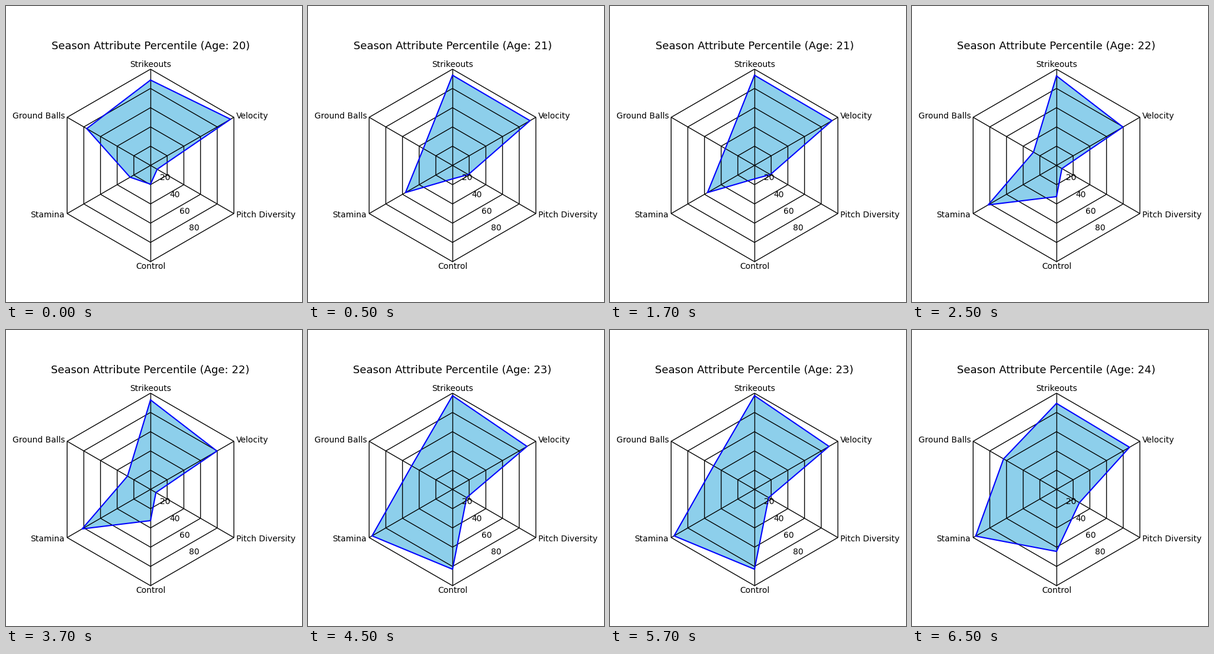
A matplotlib script that plays this animation: 500x500 px, repeating every 8000 ms.

```python
import numpy as np
import matplotlib.pyplot as plt
from matplotlib.animation import FuncAnimation

plt.rcParams["font.family"] = "DejaVu Sans"
plt.rcParams["font.size"] = 10

SIZE, DPI = 500, 100
CENTER = np.array([244.1, 269.3])
RADIUS = 162.6
FIRST_AGE = 20

# Clockwise from the top, one percentile per age.
PERCENTILES = {
    "Strikeouts": [88.7, 93.7, 93, 97.4, 89.4],
    "Velocity": [96, 93, 79.7, 89.4, 87.6],
    "Pitch Diversity": [8, 19, 6.5, 17, 27.5],
    "Control": [19.5, 14, 32.4, 82.9, 64.4],
    "Stamina": [24.5, 56.4, 82, 96.5, 97],
    "Ground Balls": [76.5, 35, 27.6, 49, 63.5],
}
SEASONS = np.transpose(list(PERCENTILES.values()))

ANGLES = np.arange(6) * np.pi / 3
SPOKES = np.column_stack([np.sin(ANGLES), -np.cos(ANGLES)])


def polygon(values):
    """Corner points for the given percentiles, in pixels."""
    return CENTER + SPOKES * RADIUS * np.reshape(values, (-1, 1)) / 100


def close(points):
    return np.vstack([points, points[:1]])


fig = plt.figure(figsize=(SIZE / DPI, SIZE / DPI), dpi=DPI, facecolor="white")
ax = fig.add_axes([0, 0, 1, 1])
ax.set(xlim=(0, SIZE), ylim=(SIZE, 0))
ax.axis("off")

grid = dict(color="black", lw=1, zorder=1.5, solid_capstyle="butt")
for level in range(20, 101, 20):
    ax.plot(*close(polygon([level] * 6)).T, **grid)

tips = polygon([100] * 6)
for name, tip, (dx, dy) in zip(PERCENTILES, tips, SPOKES):
    ax.plot(*np.column_stack([CENTER, tip]), **grid)
    side = int(np.sign(round(dx, 3)))
    align = {-1: "right", 0: "center", 1: "left"}[side]
    baseline = tip[1] + 4.2 + 8 * dy * abs(dy)
    ax.text(tip[0] + 4.1 * side, baseline, name, ha=align, va="baseline", zorder=3)

# Ring values run along a ray 60 degrees below the horizontal.
ray = np.array([np.cos(np.pi / 3), np.sin(np.pi / 3)])
for level in range(20, 100, 20):
    x, y = CENTER + ray * RADIUS * level / 100
    ax.text(x, y, str(level), ha="left", va="bottom", zorder=3)

title = ax.text(CENTER[0], 73, "", fontsize=13, ha="center", va="baseline")
area, = ax.fill([0], [0], facecolor="#8dcfeb", edgecolor="none", zorder=1)
outline, = ax.plot([], [], color="blue", lw=1.5, zorder=2)


def update(frame):
    season = (frame + 3) // 4
    points = close(polygon(SEASONS[season]))
    area.set_xy(points)
    outline.set_data(*points.T)
    title.set_text(f"Season Attribute Percentile (Age: {FIRST_AGE + season})")
    return area, outline, title


anim = FuncAnimation(fig, update, frames=16, interval=500, repeat=True)
plt.show()
```
